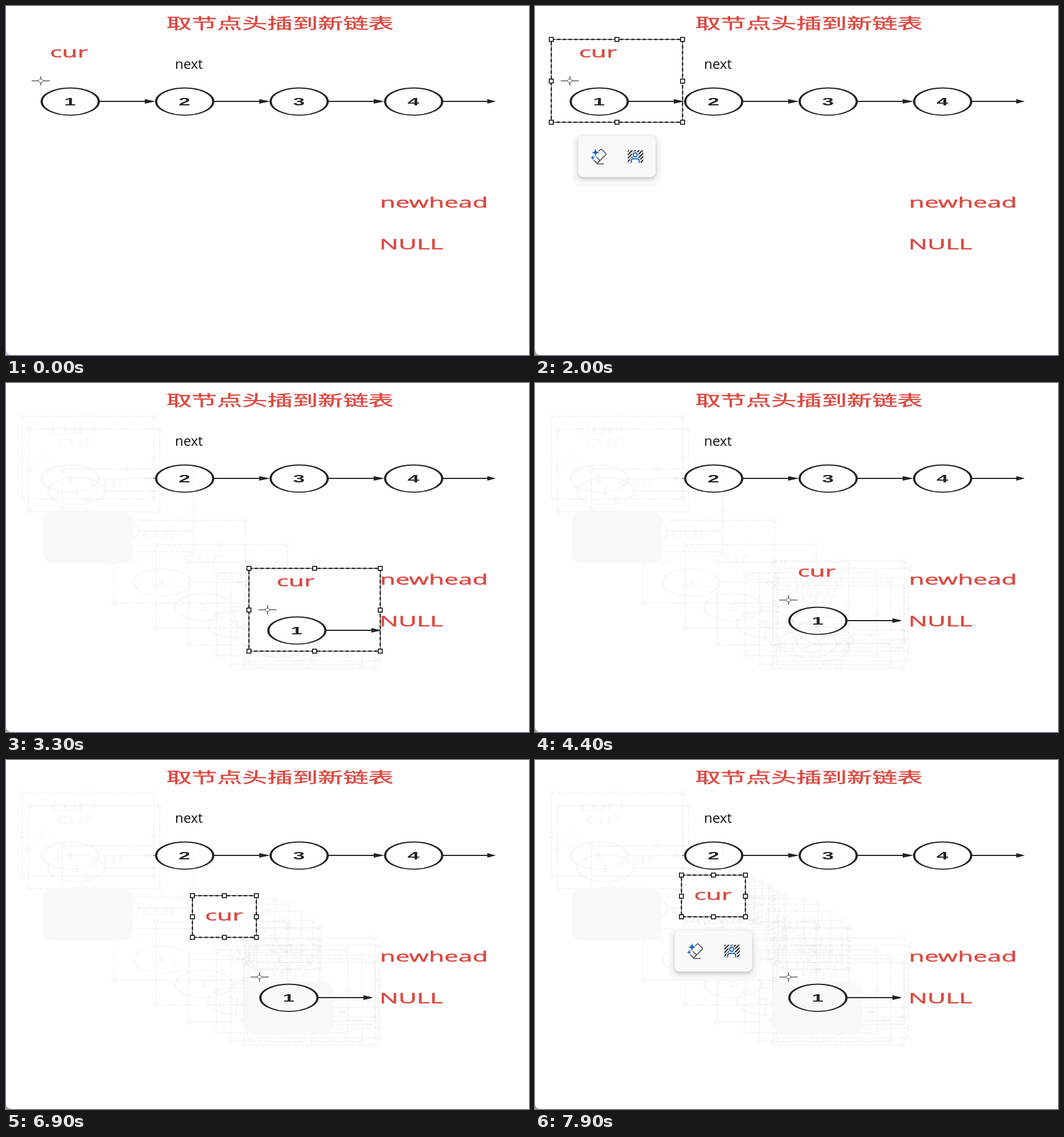
Write an HTML page with a canvas that moves like this. It is 916 px wide and 611 px high and loops after 8 s.

```html
<!DOCTYPE html>
<html lang="zh">
<head>
<meta charset="utf-8">
<title>链表头插</title>
<style>
  html, body { margin: 0; width: 100%; height: 100%; overflow: hidden; }
  canvas { display: block; }
</style>
</head>
<body>
<canvas id="stage" width="916" height="611"></canvas>
<script>
const g = document.getElementById('stage').getContext('2d');
const LOOP = 8000, STEP = 100;
const PAPER = '#fefefe', INK = '#222', RED = '#da4a42', BLUE = '#0f62c0';
const SANS = '"Open Sans", "Noto Sans CJK SC", "Noto Sans CJK", sans-serif';
const PIECE = [230, 145], LABEL = [112, 73];

// Top left corners of the dragged selections, one per step
const piecePath = [[28, 58], [39, 80], [98, 150], [189, 240], [262, 283], [319, 313], [368, 332],
  [393, 347], [416, 354], [422, 341], [425, 324], [416, 311], [411, 307]];
const labelPath = [[439, 294], [434, 292], [425, 281], [405, 264], [383, 252], [359, 243], [326, 237],
  [314, 231], [304, 225], [297, 220], [285, 213], [272, 207], [262, 203], [256, 201]];

const stepOf = (path, t, start) =>
  Math.max(0, Math.min(path.length - 1, Math.floor((t - start) / STEP)));
const easeOut = k => 1 - (1 - k) ** 2;

function text(s, x, y, font, color, stretch = 1, weight = 0) {
  g.save();
  g.translate(x, y);
  g.scale(stretch, 1);
  g.font = font;
  g.fillStyle = g.strokeStyle = color;
  g.fillText(s, 0, 0);
  if (weight) {
    g.lineWidth = weight;
    g.strokeText(s, 0, 0);
  }
  g.restore();
}
const redText = (s, x, y) => text(s, x, y, '26px ' + SANS, RED, 1.7, .5);

function line(color, width, ...points) {
  g.strokeStyle = color;
  g.lineWidth = width;
  g.beginPath();
  points.forEach(([x, y]) => g.lineTo(x, y));
  g.stroke();
}

function panel(x, y, w, h, r, fill) {
  g.beginPath();
  g.roundRect(x, y, w, h, r);
  g.fillStyle = fill;
  g.fill();
}

function node(n, x, y) {
  g.save();
  g.translate(x + .5, y + .3);
  g.scale(2, 1);
  g.strokeStyle = INK;
  g.lineWidth = 1.9;
  g.beginPath();
  g.ellipse(0, 0, 25, 23.8, 0, 0, 7);
  g.stroke();
  g.restore();
  g.textAlign = 'center';
  text(n, x, y + 7, 'bold 18px "Liberation Sans", Arial, sans-serif', INK, 2.05);
  g.textAlign = 'left';
}

function arrow(x1, x2, y, head = 19) {
  line(INK, 1.8, [x1, y], [x2 - 4, y]);
  g.fillStyle = INK;
  g.beginPath();
  g.moveTo(x2, y);
  g.lineTo(x2 - head, y - 4);
  g.lineTo(x2 - head, y + 4);
  g.fill();
}

function crosshair(x, y) {
  for (const s of [-1, 1]) {
    line('#666', 1.6, [x + 4 * s, y], [x + 16 * s, y]);
    line('#666', 1.8, [x, y + 3 * s], [x, y + 8 * s]);
  }
  g.strokeStyle = '#666';
  g.lineWidth = 1;
  g.beginPath();
  g.ellipse(x, y, 4, 3, 0, 0, 7);
  g.stroke();
}

function piece(x, y, withLabel) {
  if (withLabel) redText('cur', x + 49, y + 31.5);
  crosshair(x + 33, y + 73);
  node('1', x + 84, y + 109);
  arrow(x + 135, x + 234, y + 109);
}

function clippedPiece([x, y], withLabel) {
  g.save();
  g.beginPath();
  g.rect(x, y, ...PIECE);
  g.clip();
  piece(x, y, withLabel);
  g.restore();
}

const label = ([x, y]) => redText('cur', x + 22.5, y + 44);

function dashes([x, y], [w, h]) {
  g.strokeStyle = '#000';
  g.lineWidth = 2;
  g.setLineDash([6, 4]);
  g.strokeRect(x + .5, y + .5, w, h);
  g.setLineDash([]);
}

function frame([x, y], [w, h]) {
  g.strokeStyle = '#333';
  g.lineWidth = 1;
  g.strokeRect(x + .5, y + .5, w, h);
  dashes([x, y], [w, h]);
  g.lineWidth = 1.5;
  g.fillStyle = '#fff';
  for (const i of [0, .5, 1]) for (const j of [0, .5, 1]) {
    if (i === .5 && j === .5) continue;
    g.beginPath();
    g.rect(Math.round(x + w * i) - 3, Math.round(y + h * j) - 3, 7, 7);
    g.fill();
    g.stroke();
  }
}

function star(x, y, r) {
  g.beginPath();
  for (let i = 0; i < 8; i++) {
    const a = i * Math.PI / 4, d = i % 2 ? r * .38 : r;
    g.lineTo(x + d * Math.cos(a), y + d * Math.sin(a));
  }
  g.closePath();
  g.strokeStyle = '#f9f9f9';
  g.lineWidth = 3;
  g.stroke();
  g.fillStyle = BLUE;
  g.fill();
}

function eraserIcon(x, y) {
  g.save();
  g.translate(x, y);
  g.save();
  g.rotate(-Math.PI / 4);
  g.strokeStyle = '#444';
  g.lineWidth = 1.5;
  g.beginPath();
  g.roundRect(-10, -6, 23, 13, 2);
  g.stroke();
  line('#444', 1.5, [-3, -6], [-3, 7]);
  g.restore();
  line('#444', 1.5, [-3, 13], [10, 13]);
  star(-5, -7, 6.5);
  star(-10, 2, 4);
  g.restore();
}

function personIcon(x, y) {
  g.save();
  g.translate(x, y);
  g.beginPath();
  g.rect(-13, -11, 27, 22);
  g.clip();
  for (let i = -34; i < 34; i += 6) line('#222', 2.2, [i - 12, 12], [i + 12, -12]);
  for (const [color, width] of [['#f9f9f9', 5], [BLUE, 2]]) {
    g.strokeStyle = color;
    g.lineWidth = width;
    g.fillStyle = '#f9f9f9';
    g.beginPath();
    g.arc(0, -3, 3.5, 0, 7);
    g.fill();
    g.stroke();
    g.beginPath();
    g.moveTo(-7, 12);
    g.lineTo(-7, 8);
    g.quadraticCurveTo(-7, 4, -3, 4);
    g.lineTo(3, 4);
    g.quadraticCurveTo(7, 4, 7, 8);
    g.lineTo(7, 12);
    g.fill();
    g.stroke();
  }
  g.restore();
}

const halo = ([x, y], [w, h]) => panel(x + w / 2 - 78.5, y + h + 21, 157, 92, 18, '#f8f8f8');

function toolbar(pos, size) {
  const cx = pos[0] + size[0] / 2, top = pos[1] + size[1] + 24.5;
  halo(pos, size);
  g.save();
  g.shadowColor = 'rgba(0,0,0,.24)';
  g.shadowBlur = 7;
  g.shadowOffsetY = 3;
  panel(cx - 67.5, top, 136, 72, 9, '#f9f9f9');
  g.restore();
  eraserIcon(cx - 32, top + 36);
  personIcon(cx + 32.5, top + 36);
}

// Faint residue left where a selection has passed
function trail(path, count, size, drawContent) {
  for (const pos of path.slice(0, count)) {
    g.save();
    g.globalAlpha = .025;
    frame(pos, size);
    g.filter = 'grayscale(1)';
    drawContent(pos);
    g.restore();
  }
}

function draw(t) {
  const pieceStep = stepOf(piecePath, t, 2300), labelStep = stepOf(labelPath, t, 6300);
  const piecePos = piecePath[pieceStep], labelPos = labelPath[labelStep];
  const labelLifted = t >= 6400;

  g.fillStyle = t < 900 ? '#aebfdd' : '#aaa';
  g.fillRect(0, 0, 916, 611);
  panel(0, 0, 916, 611, [0, 0, 0, 9], PAPER);

  if (t < 2400) piece(28, 58, true);
  else {
    arrow(163, 262, 167);
    g.fillStyle = PAPER;
    g.fillRect(28, 58, ...PIECE);
    trail(piecePath, pieceStep, PIECE, pos => clippedPiece(pos, true));
    trail(labelPath, labelStep, LABEL, label);
    halo(piecePath[0], PIECE);
    if (labelLifted) halo(labelPath[0], LABEL);
  }

  redText('取节点头插到新链表', 281, 40);
  text('next', 296, 110, '24px ' + SANS, '#111');
  for (let i = 1; i < 4; i++) {
    const x = 112 + 200.5 * i;
    node(String(i + 1), x, 167);
    arrow(x + 52, i < 3 ? x + 150 : 858, 167, i < 3 ? 19 : 15);
  }
  redText('newhead', 655, 353);
  redText('NULL', 654, 426);

  if (t >= 2400) {
    if (t < 4400) {
      g.fillStyle = PAPER;
      g.fillRect(...piecePos, ...PIECE);
    }
    clippedPiece(piecePos, !labelLifted);
  }
  if (labelLifted) {
    g.fillStyle = PAPER;
    g.fillRect(...labelPos, ...LABEL);
    label(labelPos);
  }

  const sweep = (pos, size, k) => dashes(pos, size.map(v => v * easeOut(Math.min(1, k))));
  if (t >= 900 && t < 2000) sweep(piecePath[0], PIECE, (t - 800) / 1000);
  if (t >= 2000 && t < 4400) frame(piecePos, PIECE);
  if (t >= 5400 && t < 6000) sweep(labelPath[0], LABEL, (t - 5300) / 600);
  if (t >= 6000) frame(labelPos, LABEL);

  if (t >= 2000 && t < 2400 || t >= 3700 && t < 4400) toolbar(piecePos, PIECE);
  if (t >= 6000 && t < 6400 || t >= 7900) toolbar(labelPos, LABEL);
}

function tick() {
  draw(Math.floor(performance.now() % LOOP / STEP) * STEP);
  requestAnimationFrame(tick);
}
tick();
</script>
</body>
</html>
```
